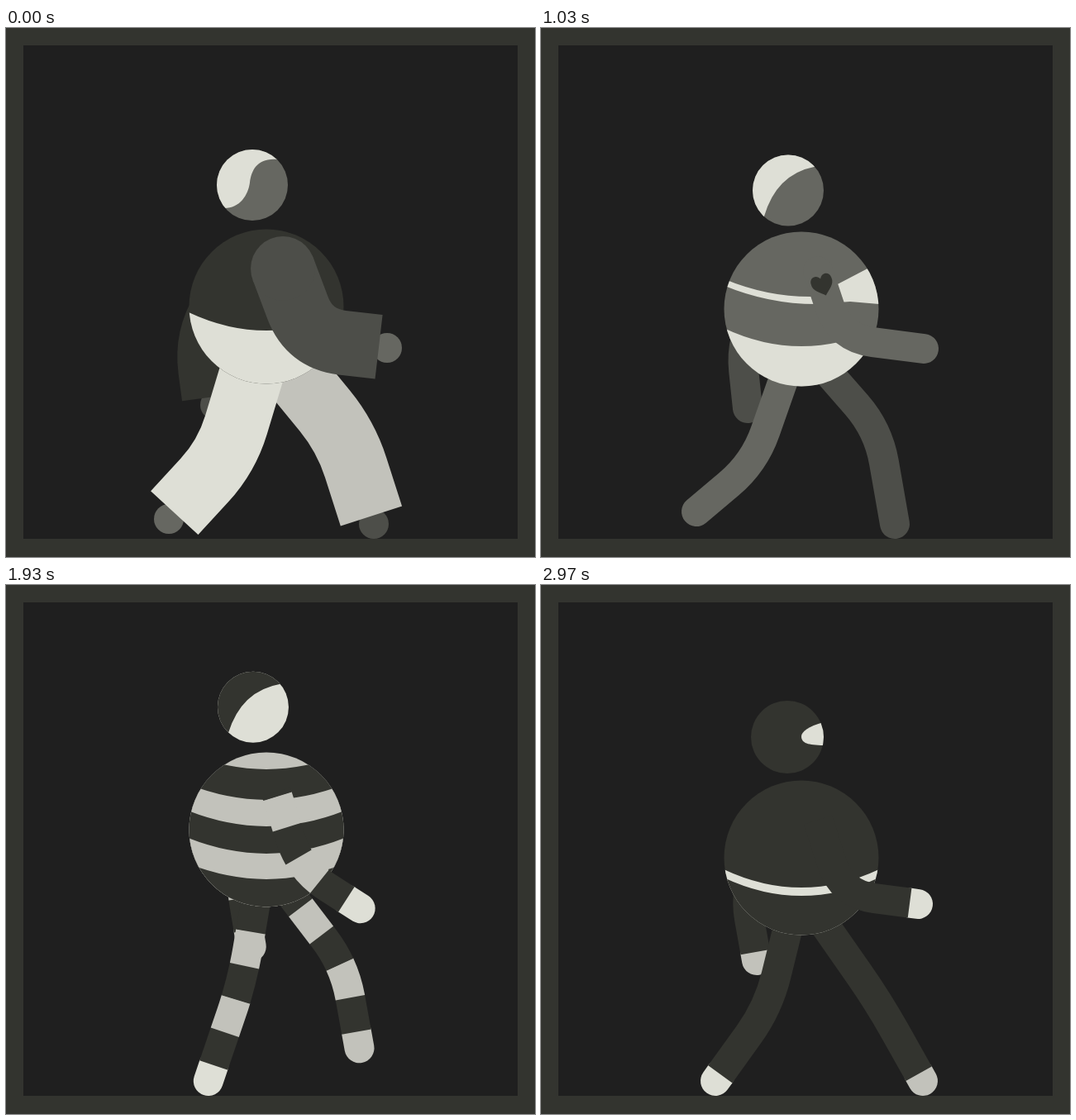
An HTML page with a canvas that plays this animation: 640x640 px, repeating every 3.01 s.

```html
<!DOCTYPE html>
<html lang="en">
<head>
<meta charset="utf-8">
<title>Walk cycle</title>
<style>
  html, body { margin: 0; width: 100%; height: 100%; overflow: hidden; background: #1f1f1f; }
  canvas { display: block; width: 640px; height: 640px; }
</style>
</head>
<body>
<canvas id="stage" width="640" height="640"></canvas>
<script>
const ctx = document.getElementById('stage').getContext('2d');
const BG = '#1f1f1f', DARK = '#33342f', SHADE = '#4d4e49', MID = '#666761',
      PALE = '#c2c2bb', LIGHT = '#dedfd6';
const LOOP = 3010, FPS = 30, STEP = 15, CYCLE = 2 * STEP, CX = 315;

// Rows: time, then torso y, head x, head y from torso, head tilt
const BODY = [
  [0, 337, 298, -147, 0], [1, 340, 299, -143.5, -1.5], [3, 342, 302, -141, 2],
  [5, 335, 304, -142, 4], [10, 284, 301, -147.5, 0], [13, 308, 298, -148, 0],
  [14, 330, 298, -146, 0]
];
// Rows: time, knee x, knee y, foot x, foot y
const LEG = [
  [0, 411, 494, 445, 600], [1, 408, 486, 428, 600], [5, 394, 503, 361, 600],
  [9, 325, 472, 295, 600], [13, 275, 487, 228, 600], [14, 275, 511, 211, 600],
  [15, 267, 518, 197, 594], [16, 258, 526, 188, 585], [18, 270, 530, 187, 562],
  [20, 316, 518, 215, 547], [24, 395, 463, 325, 538], [28, 411, 466, 458, 572],
  [29, 408, 504, 462, 600]
];
// Rows: time, shoulder x, elbow x, elbow y, hand x, hand y (y from torso)
const ARM = [
  [0, 335, 367, 39, 461, 50], [1, 335, 362, 35, 463, 48], [5, 331, 357, 49, 443, 71],
  [9, 315, 318, 55, 368, 120], [13, 298, 268, 48, 274, 144], [14, 295, 245, 35, 261, 124],
  [15, 295, 242, 37, 253, 119], [16, 295, 241, 35, 250, 120], [20, 299, 277, 55, 280, 147],
  [24, 314, 322, 58, 368, 136], [28, 331, 365, 45, 447, 79], [29, 335, 364, 44, 456, 56]
];

// Smooth cyclic interpolation through the rows
function sample(rows, time, period) {
  const n = rows.length;
  const t = ((time % period) + period) % period;
  let i = n - 1;
  while (rows[i][0] > t) i--;
  const row = k => rows[(k + n) % n];
  const at = k => row(k)[0] + period * Math.floor(k / n);
  const span = at(i + 1) - at(i), u = (t - at(i)) / span;
  const slope = (k, c) => (row(k + 1)[c] - row(k - 1)[c]) / (at(k + 1) - at(k - 1));
  return row(i).slice(1).map((a, j) => {
    const c = j + 1, b = row(i + 1)[c], v = 1 - u;
    return a * (1 + 2 * u) * v * v + b * u * u * (3 - 2 * u)
      + span * u * v * (v * slope(i, c) - u * slope(i + 1, c));
  });
}

function disc(x, y, r, color) {
  ctx.fillStyle = color;
  ctx.beginPath();
  ctx.arc(x, y, r, 0, 2 * Math.PI);
  ctx.fill();
}

function shape(d, color) {
  ctx.fillStyle = color;
  ctx.fill(new Path2D(d));
}

// A disc whose details are drawn around its centre and clipped to it
function clippedDisc(x, y, r, color, tilt, detail) {
  disc(x, y, r, color);
  ctx.save();
  ctx.beginPath();
  ctx.arc(x, y, r, 0, 2 * Math.PI);
  ctx.clip();
  ctx.translate(x, y);
  ctx.rotate(tilt * Math.PI / 180);
  detail();
  ctx.restore();
}

// Fills the torso below a sagging hem whose lowest point is y
function below(y, color, sag = 25) {
  shape(`M-100,${y - sag}Q0,${y + sag} 100,${y - sag}V110H-100Z`, color);
}

function toward(a, b, d) {
  const k = Math.min(0.9, d / Math.hypot(b[0] - a[0], b[1] - a[1]));
  return [a[0] + (b[0] - a[0]) * k, a[1] + (b[1] - a[1]) * k];
}

// Strokes the part of a bent limb between two distances from its start
function part(limb, color, width = 36, from = 0, to = 999, cap = 'butt') {
  const [a, joint, b] = limb;
  ctx.beginPath();
  ctx.moveTo(...a);
  ctx.lineTo(...toward(joint, a, 40));
  ctx.quadraticCurveTo(...joint, ...toward(joint, b, 40));
  ctx.lineTo(...b);
  ctx.strokeStyle = color;
  ctx.lineWidth = width;
  ctx.lineCap = cap;
  ctx.setLineDash([to - from, 9999]);
  ctx.lineDashOffset = -from;
  ctx.stroke();
  ctx.setLineDash([]);
}

const plain = (limb, near) => part(limb, near ? MID : SHADE, 36, 0, 999, 'round');
const cloth = near => near ? LIGHT : PALE;

function baggy(limb, near, color) {
  disc(...limb[0], 18, near ? MID : SHADE);
  part(limb, color, 78, 10);
  disc(...limb[2], 39, color);
}

function banded(limb, near, size) {
  part(limb, cloth(near), 36, 0, 20, 'round');
  for (let d = 20, i = 0; d < 300; d += size, i++)
    part(limb, i % 2 ? PALE : DARK, 36, d, d + size + 0.5);
}

function covered(limb, near) {
  part(limb, cloth(near), 36, 0, 10, 'round');
  part(limb, DARK, 36, 10);
}

function tattoo([, elbow, shoulder]) {
  const dx = elbow[0] - shoulder[0], dy = elbow[1] - shoulder[1];
  ctx.save();
  ctx.translate(shoulder[0] + dx * 0.2, shoulder[1] + dy * 0.2);
  ctx.rotate(Math.atan2(dy, dx) - Math.PI / 2);
  shape('M0,14C-5,9 -14,4 -13,-4C-13,-13 -3,-14 0,-7C3,-14 13,-13 13,-4C14,4 5,9 0,14Z', DARK);
  ctx.restore();
}

const hair = color => shape('M33,-28Q-14,-20 -30,31L-60,40V-60H40Z', color);

const robe = {
  skin: MID, shirt: DARK,
  face: () => shape('M30,-31C6,-33 -1,-18 -3,-3C-5,12 -15,28 -34,28L-60,30V-60H30Z', LIGHT),
  trim: () => below(29, LIGHT),
  arm: (limb, near) => baggy(limb, near, near ? SHADE : DARK),
  leg: (limb, near) => baggy(limb, near, cloth(near))
};

const bather = {
  skin: MID, shirt: MID,
  face: () => hair(LIGHT),
  trim() {
    shape('M-95,-37Q-40,-14 15,-15L82,-50L110,-60V-6H94L59,-9L18,-6Q-40,-6 -95,-29Z', LIGHT);
    below(45, LIGHT);
  },
  arm(limb, near) {
    plain(limb, near);
    if (near) tattoo(limb);
  },
  leg: plain
};

const stripes = {
  skin: LIGHT, shirt: PALE,
  face: () => hair(DARK),
  trim: () => [-73, -36, -4, 29, 60].forEach((y, i) => below(y, i % 2 ? PALE : DARK, 21)),
  arm: (limb, near) => banded(limb, near, 39),
  leg: (limb, near) => banded(limb, near, 42)
};

const sport = {
  skin: MID, shirt: DARK,
  face: () => shape('M-60,4L40,-49L50,-37L-60,27Z', LIGHT),
  trim: () => below(46, LIGHT, 27),
  arm(limb, near) {
    plain(limb, near);
    disc(...limb[2], 35, near ? MID : SHADE);
    part(limb, cloth(near), 37, 16, 30);
  },
  leg(limb, near) {
    part(limb, cloth(near), 36, 0, 62, 'round');
    part(limb, near ? MID : SHADE, 37, 62);
    part([...limb].reverse(), cloth(near), 40, 0, 87);
  }
};

const ninja = {
  skin: DARK, shirt: DARK,
  face: () => shape('M44,-18C25,-13 17,-6 17,-1C17,8 26,10 48,10Z', LIGHT),
  trim() {
    below(36, LIGHT);
    below(46, DARK);
  },
  arm: covered,
  leg: covered
};

const OUTFITS = [robe, bather, bather, stripes, sport, ninja];

function draw(frame) {
  const look = OUTFITS[Math.floor(frame / STEP)];
  const [y, headX, headDy, tilt] = sample(BODY, frame, STEP);

  const leg = near => {
    const [kx, ky, fx, fy] = sample(LEG, frame + (near ? STEP : 0), CYCLE);
    look.leg([[fx, fy], [kx, ky], [311, y + 35]], near);
  };
  const arm = near => {
    const [sx, ex, ey, hx, hy] = sample(ARM, frame + (near ? 0 : STEP), CYCLE);
    look.arm([[hx, y + hy], [ex, y + ey], [sx, y - 46]], near);
  };

  ctx.fillStyle = DARK;
  ctx.fillRect(0, 0, 640, 640);
  ctx.fillStyle = BG;
  ctx.fillRect(21, 21, 598, 597);

  arm(false);
  leg(false);
  leg(true);
  clippedDisc(CX, y, 93.5, look.shirt, 0, look.trim);
  arm(true);
  clippedDisc(headX, y + headDy, look === ninja ? 44 : 43, look.skin, tilt, look.face);
}

function tick() {
  const t = performance.now() % LOOP;
  const slot = Math.min(89, Math.floor((t + 4) * FPS / 1000));
  // The fourth and fifth outfits run one frame late
  draw(slot >= 45 && slot <= 75 ? slot - 1 : slot);
  requestAnimationFrame(tick);
}
tick();
</script>
</body>
</html>
```
